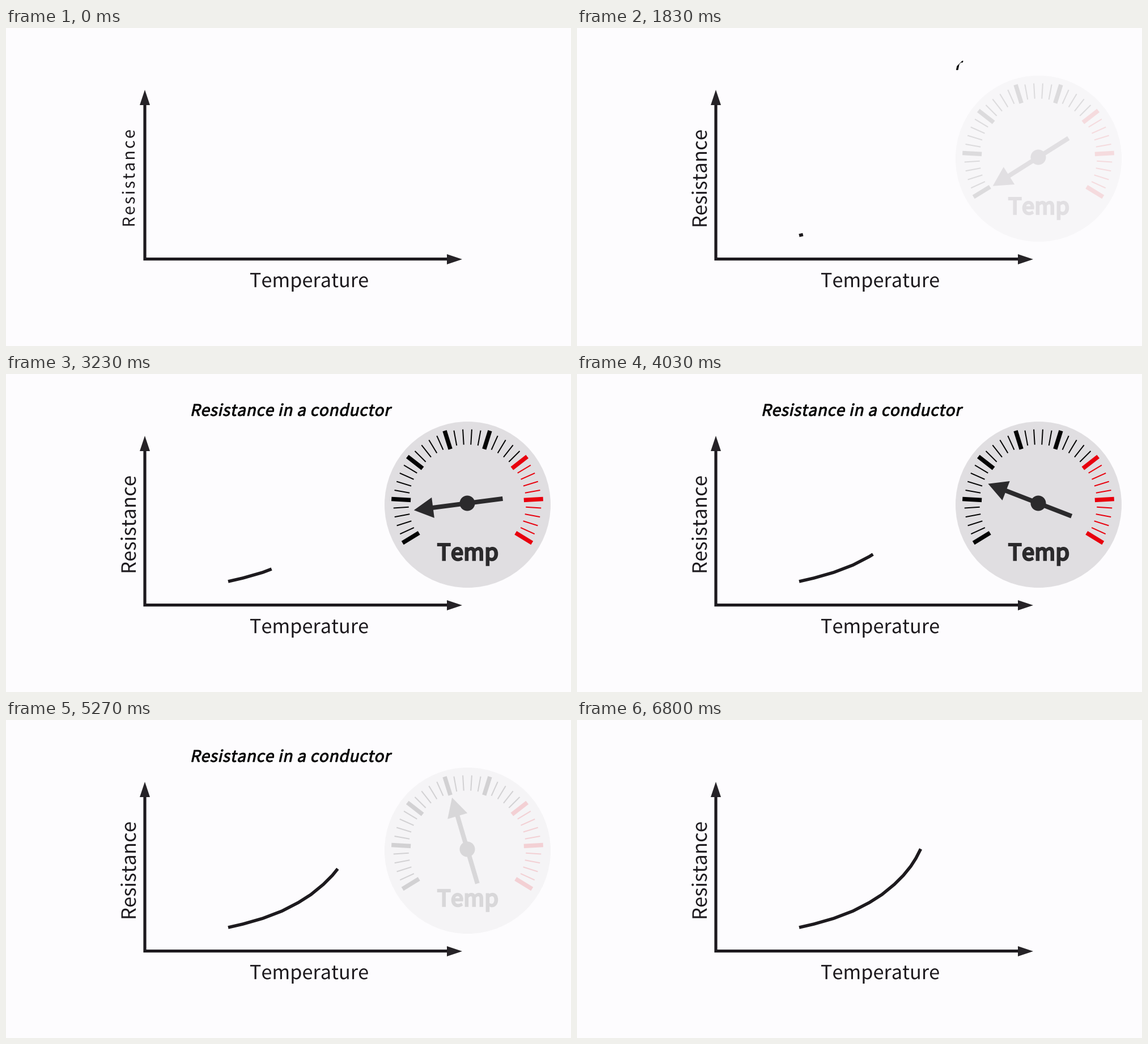
Recreate the animation shown at these times as a matplotlib script. Size 997 by 561 pixels, loop 7210 ms.

```python
import numpy as np
import matplotlib.pyplot as plt
from matplotlib.animation import FuncAnimation
from matplotlib.patches import Circle, PathPatch, Polygon
from matplotlib.path import Path
from matplotlib.textpath import TextPath
from matplotlib.transforms import Affine2D

W, H, DPI = 997, 561, 64
PX = 72 / DPI                       # line widths are in points
LOOP, STEP = 7210, 35               # ms

BG = np.array([253, 252, 254]) / 255
INK = "#1d1a1e"
GREY = np.array([224, 222, 225]) / 255
DARK = np.array([43, 42, 44]) / 255
BLACK = np.array([4, 4, 4]) / 255
RED = np.array([232, 0, 14]) / 255
FONT = {"family": "Noto Sans CJK JP"}

fig = plt.figure(figsize=(W / DPI, H / DPI), dpi=DPI, facecolor=BG)
ax = fig.add_axes([0, 0, 1, 1])
ax.set_xlim(0, W)
ax.set_ylim(H, 0)
ax.axis("off")


def ramp(t, start, end):
    return min(max((t - start) / (end - start), 0), 1)


def smooth(u):
    return u * u * (3 - 2 * u)


def glyphs(s, size, spacing=0):
    def right(part):
        return TextPath((0, 0), part + "l", size=size, prop=FONT).get_extents().x1

    parts = []
    for i, ch in enumerate(s):
        if ch != " ":
            x = right(s[:i]) - right("") + i * spacing
            parts.append(TextPath((x, 0), ch, size=size, prop=FONT))
    return Path.make_compound_path(*parts)


def text(s, size, x, y, spacing=0, slant=0, turn=0, bold=0, color=INK, zorder=1):
    """Text centred on x (or y when turned) with its baseline through the point."""
    path = Affine2D().skew_deg(slant, 0).transform_path(glyphs(s, size, spacing))
    box = path.get_extents()
    place = Affine2D().translate(-(box.x0 + box.x1) / 2, 0).scale(1, -1)
    path = place.rotate_deg(turn).translate(x, y).transform_path(path)
    patch = PathPatch(path, facecolor=color, edgecolor=color, lw=bold * PX,
                      joinstyle="miter", zorder=zorder)
    return ax.add_patch(patch)


def line(x, y, width, color=INK, zorder=1):
    return ax.plot(x, y, color=color, lw=width * PX, zorder=zorder, snap=False,
                   solid_capstyle="butt", solid_joinstyle="miter")[0]


# Axes and labels
line([245, 245, 780], [130, 407.6, 407.6], 5.2)
for head in ([(245, 109), (236, 136), (254, 136)],
             [(805, 408), (778, 399), (778, 417)]):
    ax.add_patch(Polygon(head, color="#262327", lw=0, zorder=2))
text("Temperature", 34.3, 534.8, 457.2)
label_small = text("Resistance", 29, 227, 264.5, spacing=3, turn=-90)
label_large = text("Resistance", 34.7, 229, 265, turn=-90)
title = text("Resistance in a conductor", 28, 504.3, 73.7, spacing=0.75,
             slant=12, bold=1, color="#050505")

# Curve
CURVE = np.array([(392, 366), (418, 360), (453, 350), (487, 337), (516, 322),
                  (538, 308), (560, 290), (576, 274), (589, 258), (598, 244),
                  (606.5, 227.5)])
ARC = np.r_[0, np.cumsum(np.hypot(*np.diff(CURVE, axis=0).T))]
curve = line([], [], 5.6)

# Gauge
HUB = np.array([814, 228])
FIRST, GAP = -31.5, 243 / 7         # degrees above the left horizontal


def polar(r, deg):
    a = np.radians(deg)
    return HUB - r * np.array([np.cos(a), np.sin(a)])


def ticks(indices, inner, outer, width, color):
    pts = []
    for i in indices:
        deg = FIRST + i * GAP / 5
        pts += [polar(inner, deg), polar(outer, deg), (np.nan, np.nan)]
    return line(*np.array(pts).T, width, zorder=4), color


dial = Circle((814.5, 230.5), 146.5, lw=0, zorder=3)
hub = Circle(HUB, 13.5, lw=0, zorder=6)
needle = Polygon(np.zeros((7, 2)), lw=0, zorder=5)
for part in (dial, needle, hub):
    ax.add_patch(part)
minor = [i for i in range(36) if i % 5]
marks = [
    (needle, DARK), (hub, DARK),
    (text("Temp", 39.3, 814.5, 328.3, spacing=0.6, bold=2.9, zorder=4), DARK),
    ticks(range(0, 25, 5), 100, 134, 7.5, BLACK),
    ticks(range(25, 36, 5), 100, 134, 7.5, RED),
    ticks([i for i in minor if i < 25], 103.5, 130.5, 2, BLACK),
    ticks([i for i in minor if i > 25], 103.5, 130.5, 2, RED),
]
# (distance along, distance across) from the hub
NEEDLE = np.array([(-63, -4), (61, -4), (61, -18.2), (95, 0), (61, 18.2),
                   (61, 4), (-63, 4)])


def draw_gauge(t):
    alpha = ramp(t, 1730, 2710) - ramp(t, 4430, 5410)
    # the dial is two stacked discs, so it fades faster than the marks
    face = BG + (GREY - BG) * (1 - (1 - alpha)**2)
    dial.set_color(face)
    dial.set_visible(alpha > 0)
    for part, color in marks:
        part.set_visible(alpha > 0)
        part.set_color(face + (color - face) * alpha)
    s = max(t - 1740, 0) / 1000
    deg = -32.4 + 13.1 * s**2 - 1.3 * s**3
    along, across = polar(1, deg) - HUB, polar(1, deg + 90) - HUB
    needle.set_xy(HUB + NEEDLE @ np.array([along, across]))


def draw_title(t):
    """Diagonal wipe in from the lower right, later out from the upper left."""
    if t < LOOP / 2:
        edge = 737 - 1.375 * (t - 1838)
    else:
        edge = 700 + 1.375 * (t - 6470)
    edge = min(max(edge, 0), 1900)
    band = Path([(edge, 0), (2200, 0), (2000, 200), (edge - 200, 200), (edge, 0)])
    title.set_clip_path(band, ax.transData)
    title.set_visible(1800 < t < 6520)


def draw_curve(t):
    tip = ARC[-1] * smooth(ramp(t, 1330, 6570))
    s = np.r_[ARC[ARC < tip], tip]
    curve.set_data(np.interp(s, ARC, CURVE[:, 0]), np.interp(s, ARC, CURVE[:, 1]))
    curve.set_visible(tip > 0.5)


def draw(i):
    t = (i + 0.5) * STEP            # middle of the time the picture stays
    mix = smooth(ramp(t, 70, 730))
    label_small.set_alpha(1 - mix)
    label_large.set_alpha(mix)
    draw_curve(t)
    draw_title(t)
    draw_gauge(t)
    return []


anim = FuncAnimation(fig, draw, frames=LOOP // STEP, interval=STEP,
                     repeat=True, repeat_delay=0, blit=False)
plt.show()
```
